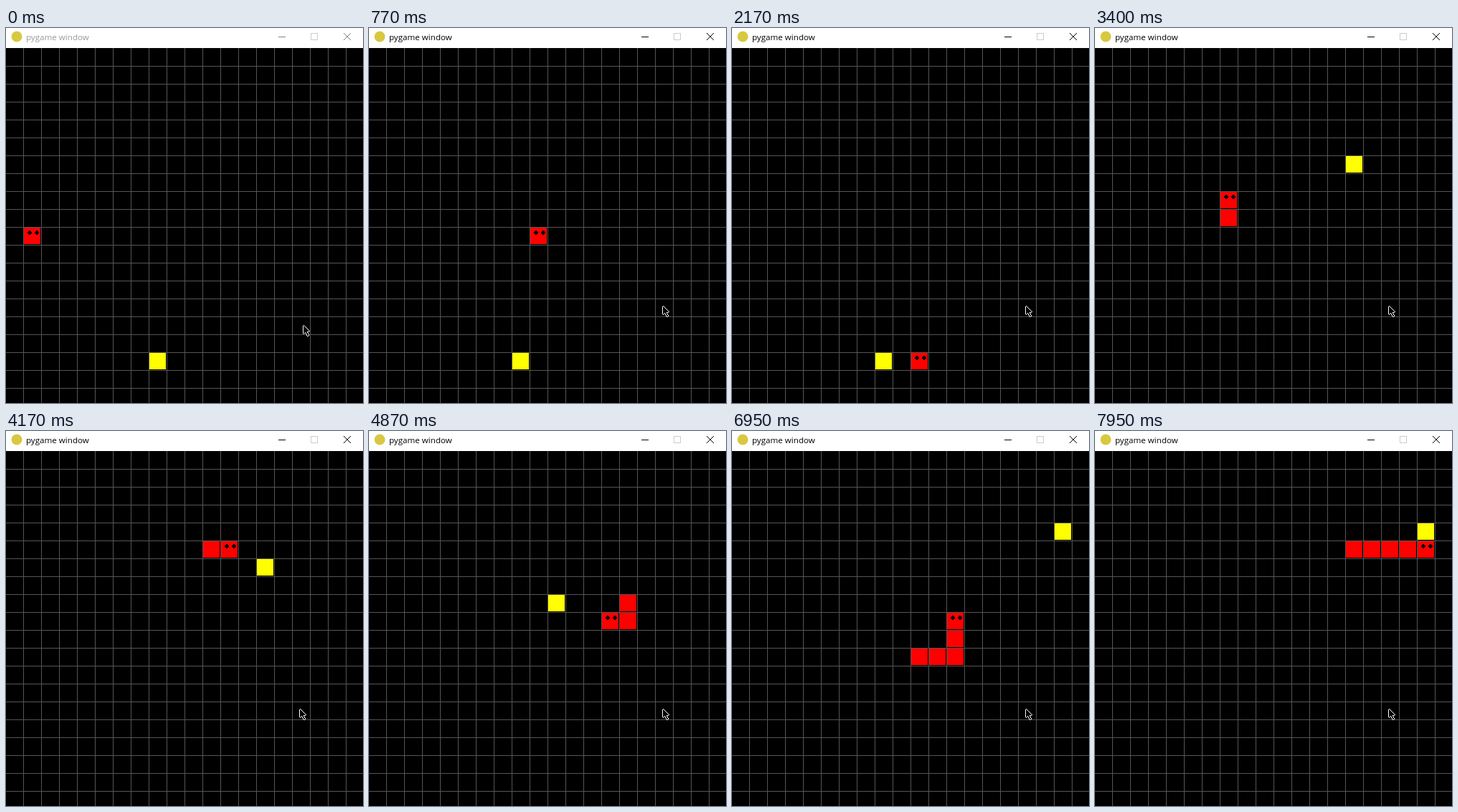
Write an HTML page with a canvas that moves like this. It is 498 by 524 pixels and loops after 8000 ms.

```html
<!DOCTYPE html>
<html lang="en">
<head>
<meta charset="utf-8">
<title>pygame window</title>
<style>
  html, body { margin: 0; width: 100%; height: 100%; overflow: hidden; background: #000; }
  canvas { position: absolute; left: 0; top: 0; display: block; }
  #title {
    position: absolute; left: 28px; top: 4px; line-height: 18px; white-space: nowrap;
    font-family: "Open Sans", "Noto Sans", sans-serif; font-size: 11.6px;
  }
</style>
</head>
<body>
<canvas id="stage" width="498" height="524"></canvas>
<div id="title">pygame window</div>
<script>
const W = 498, H = 524, BAR = 28, CELL = 25, LOOP = 8000;
// The game moves every MOVE ms; the screen is refreshed every REFRESH ms
const MOVE = 100.05, REFRESH = 77.18, PHASE = 0.573;
const ctx = document.getElementById('stage').getContext('2d');
const title = document.getElementById('title');

const route = 'R12 D7 L6 U12 R7 D4 L4 U4 L2 D6 R4 U6 R6';
const dirs = { R: [1, 0], L: [-1, 0], U: [0, -1], D: [0, 1] };
const snacks = [[8, 17], [14, 6], [10, 8], [11, 11], [18, 4]];

const path = [[1, 10]];
for (const leg of route.split(' ')) {
  const [dx, dy] = dirs[leg[0]];
  for (let n = +leg.slice(1); n > 0; n--) {
    const [x, y] = path[path.length - 1];
    path.push([x + dx, y + dy]);
  }
}

// Snacks eaten after each step
let count = 0;
const eaten = path.map(([x, y]) => {
  const [sx, sy] = snacks[count];
  if (x === sx && y === sy) count++;
  return count;
});

function rect(color, x, y, w, h) {
  ctx.fillStyle = color;
  ctx.fillRect(x, y, w, h);
}

function cell([c, r], color) {
  rect(color, c * CELL, BAR + 1 + r * CELL, CELL - 2, CELL - 2);
}

function eye(x, y) {
  for (let i = 1; i <= 3; i++) rect('#000', x - i, y - 4 + i, 2 * i, 8 - 2 * i);
}

function drawGrid() {
  rect('#000', 0, BAR, W, H - BAR);
  for (let p = CELL; p < 500; p += CELL) {
    rect('#555', p - 1, BAR, 1, H - BAR);
    rect('#555', 0, BAR + p, W, 1);
  }
}

function drawBar(active) {
  const ink = active ? '#000' : '#808080';
  rect('#fff', 0, 0, W, BAR);
  ctx.fillStyle = '#d8c840';
  ctx.beginPath();
  ctx.arc(15, 12, 7.5, 0, 7);
  ctx.fill();
  rect(ink, 380, 12, 10, 1);
  ctx.lineWidth = 1;
  ctx.strokeStyle = '#ccc';
  ctx.strokeRect(425.5, 7.5, 9, 9);
  ctx.strokeStyle = ink;
  ctx.beginPath();
  ctx.moveTo(471, 7); ctx.lineTo(481, 17);
  ctx.moveTo(481, 7); ctx.lineTo(471, 17);
  ctx.stroke();
  title.style.color = active ? '#000' : '#999';
}

// Arrow head as growing rows, then its left foot and slanted tail
function arrow(color, x, y) {
  for (let i = 1; i <= 8; i++) rect(color, x + 1, y + i, i, 1);
  rect(color, x + 1, y + 9, 5, 1);
  rect(color, x + 1, y + 10, 2, 1);
  rect(color, x + 1, y + 11, 1, 1);
  for (let i = 10; i <= 14; i++) rect(color, x + Math.floor((i - 1) / 2), y + i, 2, 1);
}

function drawPointer(x, y) {
  for (const [dx, dy] of Object.values(dirs)) arrow('#fff', x + dx, y + dy);
  arrow('#000', x, y);
}

function draw(t) {
  const shot = Math.floor((t + 5) / REFRESH);
  const step = Math.floor(shot * REFRESH / MOVE + PHASE);
  const body = path.slice(Math.max(0, step - eaten[step]), step + 1);
  const [hx, hy] = path[step];
  const glide = Math.min(shot / 2, 1);

  drawGrid();
  body.forEach(pos => cell(pos, '#f00'));
  eye(hx * CELL + 8, BAR + hy * CELL + 8);
  eye(hx * CELL + 18, BAR + hy * CELL + 8);
  cell(snacks[eaten[step]], '#ff0');
  drawBar(shot >= 5);
  drawPointer(Math.round(414 - 5 * glide), Math.round(415 - 27 * glide));
}

function tick() {
  draw(performance.now() % LOOP);
  requestAnimationFrame(tick);
}
tick();
</script>
</body>
</html>
```
